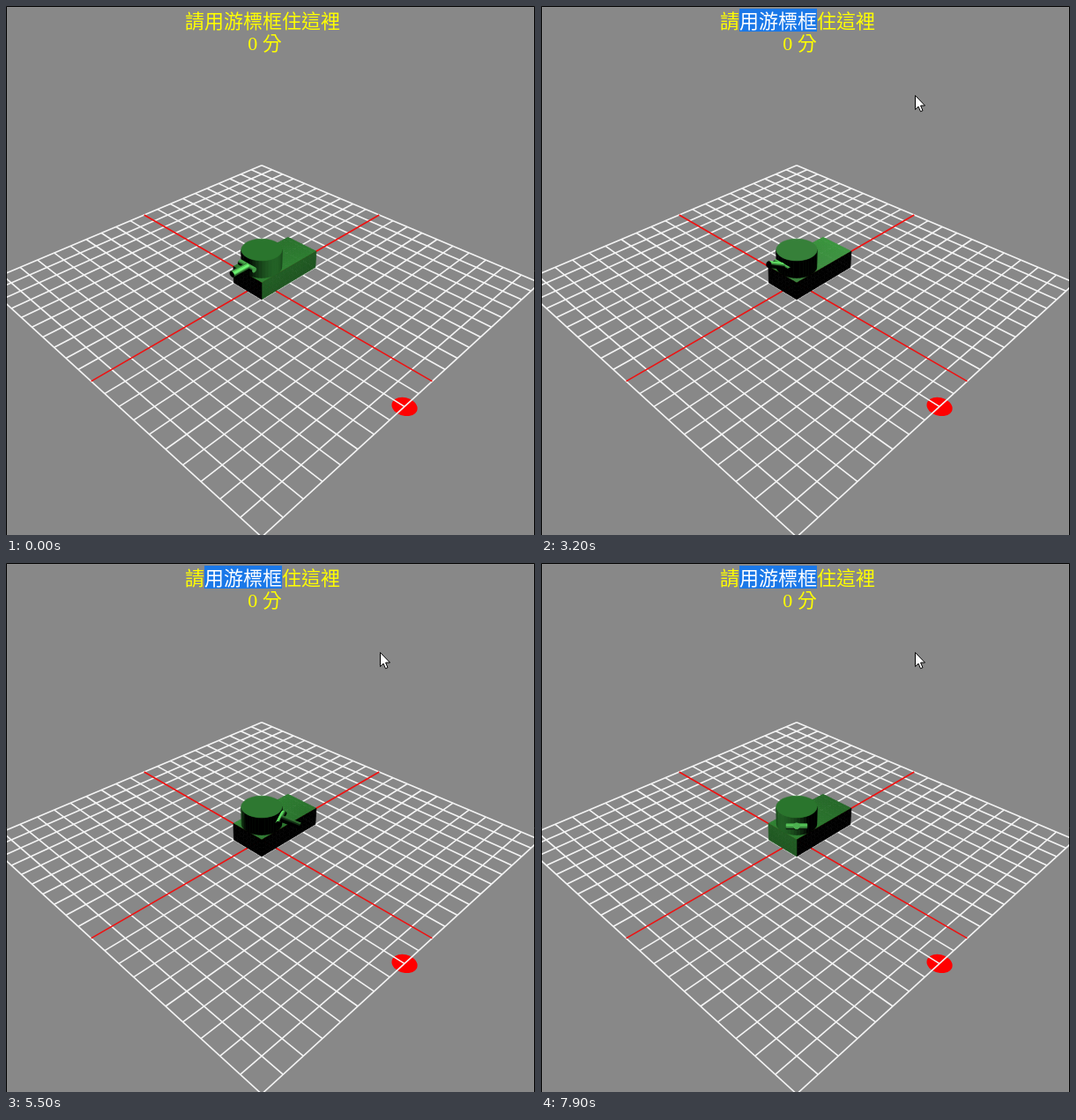
Animation of 600 by 600 pixels, one loop 8000 ms. Source, as an HTML page with a canvas:

```html
<!DOCTYPE html>
<html lang="zh-Hant">
<head>
<meta charset="utf-8">
<style>
html, body { margin: 0; width: 100%; height: 100%; overflow: hidden; background: #888; }
canvas { display: block; }
</style>
</head>
<body>
<canvas id="stage" width="600" height="600"></canvas>
<script>
const ctx = document.getElementById('stage').getContext('2d');
const LOOP = 8000, FOCAL = 700, DIST = 313.7, EYE = Array(3).fill(DIST / Math.sqrt(3));
const HULL = [58, 160, 62], GUN = [108, 250, 112];
const FONT = '22px "Liberation Serif", "Noto Sans CJK TC", "Noto Sans CJK JP", serif';

const add = (a, b, k = 1) => a.map((v, i) => v + b[i] * k);
const dot = (a, b) => a[0] * b[0] + a[1] * b[1] + a[2] * b[2];
const unit = a => a.map(v => v / Math.hypot(...a));
const clamp = (v, lo, hi) => Math.min(hi, Math.max(lo, v));
const ramp = (t, from, to) => clamp((t - from) / (to - from), 0, 1);

// Camera on the (1,1,1) diagonal, looking at the origin
function project([x, y, z]) {
  const k = FOCAL / (DIST - (x + y + z) / Math.sqrt(3));
  return [290 + k * (x - z) / Math.SQRT2, 314 - k * (2 * y - x - z) / Math.sqrt(6)];
}

function trace(points) {
  ctx.beginPath();
  points.forEach(p => ctx.lineTo(...project(p)));
}

function line(a, b, color) {
  trace([a, b]);
  ctx.strokeStyle = color;
  ctx.lineWidth = 1.6;
  ctx.stroke();
}

let light;

function face(points, normal, base) {
  const mid = points.reduce((s, p) => add(s, p, 1 / points.length), [0, 0, 0]);
  const view = unit(add(EYE, mid, -1));
  if (dot(normal, view) <= 0) return;
  const ray = unit(add(light, mid, -1));
  const lit = Math.max(0, dot(normal, ray));
  const mirror = add(normal.map(v => 2 * lit * v), ray, -1);
  const shine = lit && 30 * Math.max(0, dot(mirror, view)) ** 8;
  trace(points);
  ctx.closePath();
  ctx.fillStyle = ctx.strokeStyle = `rgb(${base.map(v => Math.round(v * lit + shine))})`;
  ctx.lineWidth = 0.6;
  ctx.fill();
  ctx.stroke();
}

function tube(start, axis, u, v, radius, length, n, base) {
  const spoke = i => {
    const a = i / n * 2 * Math.PI;
    return add(u.map(c => c * Math.cos(a)), v, Math.sin(a));
  };
  const rim = center => Array.from({ length: n }, (_, i) => add(center, spoke(i), radius));
  const near = rim(start), far = rim(add(start, axis, length));
  for (let i = 0; i < n; i++) {
    const j = (i + 1) % n;
    face([near[i], near[j], far[j], far[i]], spoke(i + 0.5), base);
  }
  face(near, axis.map(c => -c), base);
  face(far, axis, base);
}

// A rectangle split into cells so that the shading can vary across it
function panel(origin, u, v, nu, nv, normal) {
  for (let i = 0; i < nu; i++) for (let j = 0; j < nv; j++) {
    const at = (a, b) => add(add(origin, u, a / nu), v, b / nv);
    face([at(i, j), at(i + 1, j), at(i + 1, j + 1), at(i, j + 1)], normal, HULL);
  }
}

function drawGround() {
  trace(Array.from({ length: 40 }, (_, i) => {
    const a = i / 20 * Math.PI;
    return [100 + 5 * Math.cos(a), 0, 20 + 5 * Math.sin(a)];
  }));
  ctx.fillStyle = '#f00';
  ctx.fill();
  const cross = (i, color) => {
    line([i, 0, -100], [i, 0, 100], color);
    line([-100, 0, i], [100, 0, i], color);
  };
  for (let i = -100; i <= 100; i += 10) if (i) cross(i, '#f4f4f4');
  cross(0, '#f01010');
}

function drawTank(t) {
  const orbit = 0.6 * (t / 1000 - 0.15);
  light = [75 * Math.cos(orbit), 100, -75 * Math.sin(orbit)];

  panel([-10, 10, -30], [20, 0, 0], [0, 0, 40], 10, 20, [0, 1, 0]);
  panel([10, 0, -30], [0, 10, 0], [0, 0, 40], 4, 16, [1, 0, 0]);
  panel([-10, 0, 10], [20, 0, 0], [0, 10, 0], 8, 4, [0, 0, 1]);

  // The gun nods up and down twice, then the turret spins
  const turn = 255 * ramp(t, 4900, 6200) + 510 * ramp(t, 6200, 7700);
  const lift = 60 * ramp(t, 3000, 3400) - 75 * ramp(t, 3500, 3800) + 75 * ramp(t, 3900, 4200)
    - 75 * ramp(t, 4300, 4800) + 50 * ramp(t, 6700, 7300);
  const yaw = turn * Math.PI / 180, pitch = lift * Math.PI / 180;
  const s = Math.sin(yaw), c = Math.cos(yaw), up = Math.sin(pitch), out = Math.cos(pitch);
  const side = [c, 0, -s], aim = [s * out, up, c * out], over = [-s * up, out, -c * up];
  const pivot = [10 * s, 15, 10 * c];

  const turret = () => tube([0, 10, 0], [0, 1, 0], [1, 0, 0], [0, 0, 1], 10, 10, 40, HULL);
  const axle = () => tube(add(pivot, side, -5), side, aim, over, 1.3, 10, 12, GUN);
  const barrel = () => tube(pivot, aim, side, over, 1.5, 10, 12, GUN);
  const parts = dot(aim, [1, 1, 1]) > 0 ? [axle, barrel] : [barrel, axle];
  if (s + c > 0) parts.unshift(turret); else parts.push(turret);
  parts.forEach(draw => draw());
}

// The pointer enters, drags over the title and settles below it
const pointerAt = t => [
  523 - 303 * ramp(t, 100, 500) + 95 * ramp(t, 500, 1300) + 88 * ramp(t, 1300, 1900) + 21 * ramp(t, 1900, 2700),
  150 - 136 * ramp(t, 100, 500) - 9 * ramp(t, 500, 800) + 94 * ramp(t, 1300, 1900) + 2 * ramp(t, 1900, 2700)
];

function drawText(t) {
  const dragged = Math.floor((pointerAt(t)[0] - 225) / 22);
  const chosen = t < 500 ? 0 : clamp(dragged, 0, 4);
  ctx.fillStyle = '#1a78e8';
  ctx.fillRect(225, 3, 22 * chosen, 26);
  ctx.font = FONT;
  ctx.textAlign = 'left';
  [...'請用游標框住這裡'].forEach((char, i) => {
    ctx.fillStyle = i > 0 && i <= chosen ? '#fff' : '#ff0';
    ctx.fillText(char, 203 + 22 * i, 25);
  });
  ctx.fillStyle = '#ff0';
  ctx.textAlign = 'center';
  ctx.fillText('0 分', 293.5, 50);
}

function drawPointer(t) {
  if (t < 100) return;
  ctx.save();
  ctx.translate(...pointerAt(t).map(Math.round));
  const arrow = new Path2D('M.5 .5V16.5L4 13L6.5 18.7L9 17.6L6.6 12H11.5Z');
  ctx.fillStyle = '#fff';
  ctx.strokeStyle = '#000';
  ctx.lineWidth = 1;
  ctx.fill(arrow);
  ctx.stroke(arrow);
  ctx.restore();
}

function frame(now) {
  const t = Math.floor(now % LOOP / 100) * 100;
  ctx.fillStyle = '#888';
  ctx.fillRect(0, 0, 600, 600);
  ctx.lineJoin = 'round';
  drawGround();
  drawTank(t);
  drawText(t);
  ctx.strokeStyle = '#000';
  ctx.lineWidth = 1;
  ctx.strokeRect(0.5, 0.5, 599, 620);
  drawPointer(t);
  requestAnimationFrame(frame);
}
requestAnimationFrame(frame);
</script>
</body>
</html>
```
